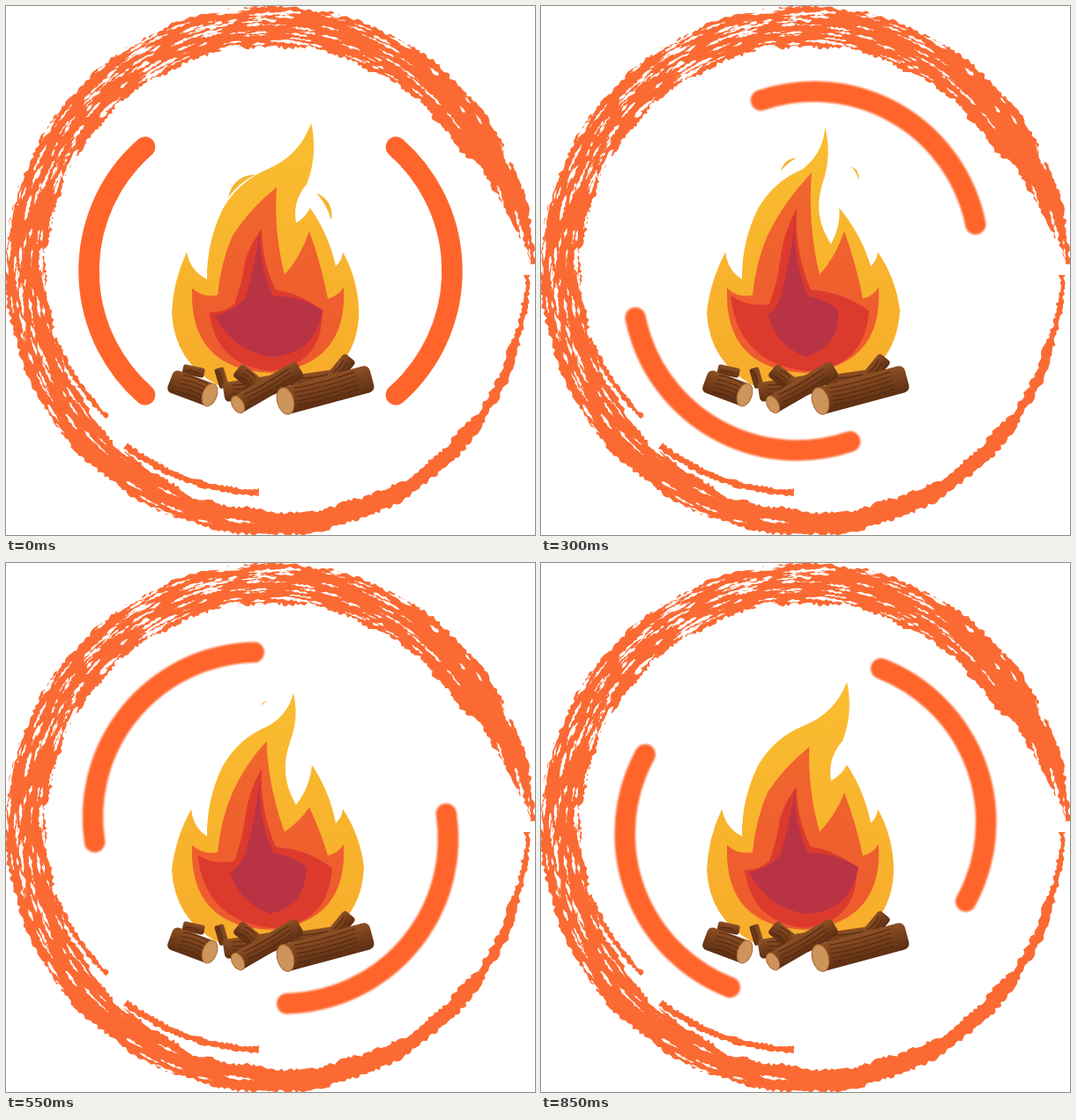
Write an HTML page with a canvas that moves like this. It is 600 px wide and 600 px high and loops after 900 ms.

```html
<!DOCTYPE html>
<html lang="en">
<head>
<meta charset="utf-8">
<title>Campfire</title>
<style>
html, body { margin: 0; width: 100%; height: 100%; overflow: hidden; background: #fff; }
canvas { display: block; }
</style>
</head>
<body>
<canvas id="stage" width="600" height="600"></canvas>
<script>
const STEPS = 18, STEP_MS = 50, RAD = Math.PI / 180;
const ctx = document.getElementById('stage').getContext('2d');

let seed = 7;
const random = () => (seed = seed * 16807 % 2147483647) / 2147483647;
const mix = (a, b, k) => a + (b - a) * k;

function gradient(y0, y1, from, to) {
  const g = ctx.createLinearGradient(0, y0, 0, y1);
  g.addColorStop(0, from);
  g.addColorStop(1, to);
  return g;
}
const yellow = gradient(150, 420, '#f9bc2f', '#f7ad2b');
const orange = gradient(200, 415, '#f0662e', '#ee5a2e');

// Closed clockwise outline; each [x, y, bow] is reached by an arc bulging outward by bow.
function blob(fill, points) {
  let [x, y] = points.at(-1);
  ctx.beginPath();
  ctx.moveTo(x, y);
  for (const [px, py, bow] of points) {
    const dx = px - x, dy = py - y;
    ctx.quadraticCurveTo(x + dx / 2 + dy * bow, y + dy / 2 - dx * bow, px, py);
    [x, y] = [px, py];
  }
  ctx.fillStyle = fill;
  ctx.fill();
}

// Every tip and notch sways once per loop, each with its own delay.
function flame(step) {
  const sway = (size, delay) => size * Math.cos((step - delay) * 2 * Math.PI / STEPS);
  const lean = sway(1, -1);

  blob(yellow, [
    [240, 430, 0], [188, 348, .28],
    [208 + sway(3, 9), 279, .1], [228, 310, -.25], [246, 230, .12], [297, 185, .17],
    [333 + 14 * lean, 139 + sway(8, 11), -.22],
    [329 + 13 * lean, 202, .15], [329, 262 - sway(16, 0), -.24],
    [344 + sway(6, 14), 229, -.15], [374, 295, .1],
    [382, 279, -.2], [404 - 4 * lean, 345, .12], [350, 430, .3]
  ]);
  blob(orange, [
    [211, 320, .5], [240, 328, -.25], [257, 260, .08],
    [303 + sway(8, 3), 200 + sway(11, -3), .08], [316, 305, -.08],
    [344, 263 + sway(15, 12), -.1], [365, 332, .04],
    [383, 319, -.2], [300, 416, .48]
  ]);
  blob('#dd3a2e', [
    [222 + 9 * lean, 337 + 11 * lean, .4], [259, 338, -.2], [271, 290, -.06],
    [290, 240 + 14 * lean, .1], [306, 322, -.12],
    [366 - 8 * lean, 346, .15], [300, 414, .45]
  ]);
  blob('#b83445', [
    [248 - 12 * lean, 351, .25], [271, 332, -.15],
    [288, 246 + 8 * lean, -.05], [303, 329, -.12],
    [347 + 13 * lean, 345, .15], [300, 398, .4]
  ]);

  const rise = 5 * step;
  spark(252 + 3.4 * step, 217 - rise, 31, -26, 1 - step / 14);
  spark(352, 212 - rise, 17, 31, 1 - step / 12);
}

function spark(x, y, dx, dy, size) {
  if (size > 0) blob('#f5b330', [[x + dx * size, y + dy * size, .38], [x, y, -.12]]);
}

function brackets(step) {
  const radius = 187, half = Math.asin(140.5 / radius);
  ctx.save();
  ctx.translate(300, 300.5);
  ctx.rotate(step * 20 * RAD);
  if (step % 9) ctx.filter = 'blur(1px)';
  ctx.strokeStyle = '#ff652b';
  ctx.lineWidth = 23.5;
  ctx.lineCap = 'round';
  for (const side of [1, -1]) {
    const turn = side < 0 ? Math.PI : 0;
    ctx.beginPath();
    ctx.arc(19 * side, 0, radius, turn - half, turn + half);
    ctx.stroke();
  }
  ctx.restore();
}

function log(x0, y0, x1, y1, width, sawn) {
  const length = Math.hypot(x1 - x0, y1 - y0), r = width / 2;
  const up = x1 < x0 ? -1 : 1;
  const bark = ctx.createLinearGradient(0, -r * up, 0, r * up);
  bark.addColorStop(0, '#8d5024');
  bark.addColorStop(1, '#5d2e13');
  ctx.save();
  ctx.translate(x0, y0);
  ctx.rotate(Math.atan2(y1 - y0, x1 - x0));
  ctx.fillStyle = bark;
  ctx.beginPath();
  ctx.roundRect(-3, -r, length + r, width, r * .45);
  ctx.fill();
  ctx.strokeStyle = '#522710';
  ctx.lineWidth = 1;
  ctx.beginPath();
  for (let y = 4 - r; y < r - 2; y += 5) {
    ctx.moveTo(length * .15, y);
    ctx.quadraticCurveTo(length * .5, y + 3, length * .95, y);
  }
  ctx.stroke();
  if (sawn) {
    ctx.beginPath();
    ctx.ellipse(0, 0, r * .6, r, 0, 0, 7);
    ctx.fillStyle = '#cd945b';
    ctx.fill();
    ctx.strokeStyle = '#a9682f';
    ctx.stroke();
  }
  ctx.restore();
}

function logs() {
  log(222, 416, 203, 412, 11);
  log(247, 430, 242, 413, 11);
  log(250, 438, 300, 430, 22);
  log(282, 428, 267, 416, 18);
  log(325, 428, 374, 421, 18);
  log(372, 421, 387, 403, 17);
  log(231, 441, 196, 428, 27, true);
  log(263, 452, 327, 415, 21, true);
  log(317, 448, 403, 425, 31, true);
}

// Ragged strip along the circle; edges(k) gives inner and outer radius for k from 0 to 1.
function strip(g, from, to, rough, edges) {
  const inner = [], outer = [];
  for (let a = from; a < to; a += .6) {
    const [lo, hi] = edges((a - from) / (to - from));
    for (const [side, edge] of [[inner, lo], [outer, hi]]) {
      const r = edge + (random() - .5) * rough;
      side.push([300 + r * Math.cos(a * RAD), 300 + r * Math.sin(a * RAD)]);
    }
  }
  g.beginPath();
  for (const p of [...inner, ...outer.reverse()]) g.lineTo(...p);
  g.fill();
}

function paintRing() {
  const sheet = document.createElement('canvas');
  sheet.width = sheet.height = 600;
  const g = sheet.getContext('2d');

  // The brush swells over the first half turn and lifts off near the end.
  const outerAt = a => 300 - 7 * Math.max(0, 1 - a / 60);
  const widthAt = a => 5 + 40 * Math.min(1, a / 165, (360 - a) / 32);
  const strand = (from, to, r0, r1, w) => strip(g, from, to, 3, k => {
    const r = mix(r0, r1, k);
    return [r - w / 2, r + w / 2];
  });

  g.fillStyle = '#fb6a33';
  strip(g, 1, 359, 4, k => {
    const a = 1 + k * 358, wave = 1.5 * Math.sin(a / 4) + Math.sin(a / 1.7);
    return [outerAt(a) - widthAt(a) + wave, outerAt(a) + Math.sin(a / 3)];
  });
  strand(93, 130, 252, 258, 7);
  strand(138, 163, 249, 256, 5);

  // Dry-brush gaps, densest on the left.
  g.fillStyle = '#fff';
  for (let i = 0; i < 250; i++) {
    const a = 222 + (random() + random() - 1) * 140;
    const r = outerAt(a) - widthAt(a) * random();
    const length = 2 + random() * 5, w = .5 + random() * 1.3;
    strip(g, a, a + length, 2, k => {
      const swell = w * Math.sin(k * Math.PI);
      return [r - swell, r + swell];
    });
  }
  return sheet;
}
const ring = paintRing();

function draw(now) {
  const step = Math.floor(now / STEP_MS) % STEPS;
  ctx.fillStyle = '#fff';
  ctx.fillRect(0, 0, 600, 600);
  ctx.drawImage(ring, 0, 0);
  brackets(step);
  flame(step);
  logs();
}

const start = performance.now();
function tick() {
  draw(performance.now() - start);
  requestAnimationFrame(tick);
}
tick();
</script>
</body>
</html>
```
